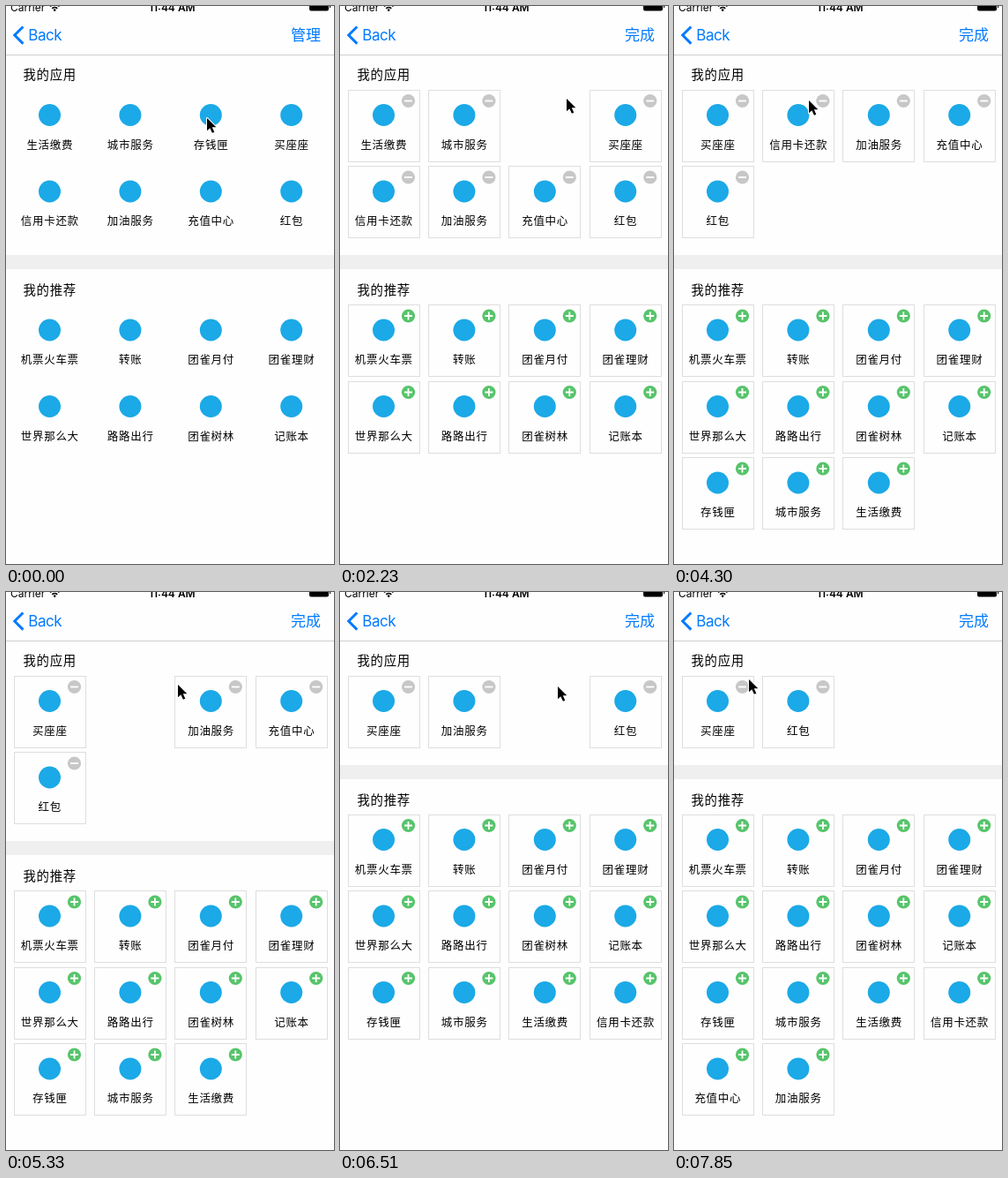
Write an HTML page that moves like this. It is 372 by 632 pixels and loops after 8 s.

```html
<!DOCTYPE html>
<html lang="zh-CN">
<head>
<meta charset="utf-8">
<style>
  html, body { margin: 0; width: 100%; height: 100%; overflow: hidden; background: #fefefe; }
  svg { display: block; width: 372px; height: 632px; }
  text { font-family: Inter, "Noto Sans CJK SC", "Noto Sans CJK", sans-serif; fill: #000; }
  .label { font-size: 12.5px; letter-spacing: .7px; text-anchor: middle; }
  .title { font-size: 14.4px; letter-spacing: .7px; }
  .link { font-size: 17px; fill: #007aff; }
  .status { font-size: 12px; }
</style>
</head>
<body>
<svg id="stage" viewBox="0 0 372 632">
  <rect width="372" height="632" fill="#fefefe"/>
  <text class="status" x="5" y="5.5">Carrier</text>
  <g fill="none" stroke="#000" stroke-width="1.7">
    <path d="M50 0.5A7.5 7.5 0 0 1 60.5 0.5M52.3 2.8A4.3 4.3 0 0 1 58.2 2.8"/>
    <circle cx="55.2" cy="4.6" r=".5"/>
  </g>
  <text class="status" x="188.3" y="5.5" text-anchor="middle" font-weight="600">11:44 AM</text>
  <path d="M344 0H366V3.5Q366 5.5 364 5.5H346Q344 5.5 344 3.5ZM367 0H368V2H367Z"/>
  <path d="M19.4 23.5L9.8 33L19.4 42.6" fill="none" stroke="#007aff" stroke-width="3"/>
  <text class="link" x="25.2" y="39" letter-spacing="-.4">Back</text>
  <text class="link" id="mode" x="323" y="39.4"></text>
  <rect y="55" width="372" height="1" fill="#cfcfcf"/>
  <text class="title" x="19.5" y="83.3">我的应用</text>
  <g id="divider">
    <rect width="372" height="16" fill="#efefef"/>
    <text class="title" x="19.5" y="45">我的推荐</text>
  </g>
  <g id="cells"></g>
  <path id="cursor" d="M0 0V14.2L3.3 11.2L5.9 16.8L8.3 15.7L5.8 10.3H10.3Z"
    stroke="#fff" stroke-width="2" paint-order="stroke" stroke-linejoin="round"/>
</svg>
<script>
const LOOP = 8000, TICK = LOOP / 54;
const EDIT_START = 5;
const ROW = 86.5, COL = 91.4;

const mine = ['生活缴费', '城市服务', '存钱匣', '买座座', '信用卡还款', '加油服务', '充值中心', '红包'];
const more = ['机票火车票', '转账', '团雀月付', '团雀理财', '世界那么大', '路路出行', '团雀树林', '记账本'];

// Tick at which each app has faded out of the first section.
const removals = [
  [15, '存钱匣'], [22, '城市服务'], [27, '生活缴费'],
  [36, '信用卡还款'], [44, '充值中心'], [50, '加油服务']
];

// Pointer path: tick, x, y.
const pointer = [
  [4, 228, 127], [9, 236, 126], [12, 257, 105], [15, 257, 105], [19, 173, 105],
  [20, 173, 105], [22, 175, 104], [25, 78, 107], [27, 78, 107], [29, 153, 107],
  [32, 165, 105], [35, 167, 105], [36, 195, 105], [38, 235, 107], [39, 235, 107],
  [42, 258, 107], [43, 258, 107], [44, 247, 107], [46, 161, 106], [47, 161, 106],
  [48, 166, 107], [49, 166, 107], [53, 85, 99]
];

const $ = id => document.getElementById(id);
const clamp = v => Math.max(0, Math.min(1, v));
const mix = (a, b, p) => a + (b - a) * p;
const ease = p => p * p * (3 - 2 * p);
const place = (el, x, y) => el.setAttribute('transform', `translate(${x} ${y})`);

function layout(count) {
  const gone = removals.slice(0, count).map(r => r[1]);
  const top = mine.filter(name => !gone.includes(name));
  const divider = 95 + ROW * Math.ceil(top.length / 4) + 14;
  const spots = {};
  const fill = (names, y, added) => names.forEach((name, i) => {
    spots[name] = { x: 9 + COL * (i % 4), y: y + ROW * Math.floor(i / 4), added };
  });
  fill(top, 95, false);
  fill(more.concat(gone), divider + 56.5, true);
  return { spots, divider };
}

const layouts = Array.from({ length: removals.length + 1 }, (_, i) => layout(i));

const cells = [...mine, ...more].map(name => {
  const el = document.createElementNS('http://www.w3.org/2000/svg', 'g');
  el.innerHTML = `
    <rect class="edit border" x=".5" y=".5" width="81" height="81" fill="#fefefe" stroke="#dedede"/>
    <circle cx="40.5" cy="28.5" r="12.5" fill="#1ba9e7"/>
    <text class="label" x="40.8" y="66.9">${name}</text>
    <g class="edit">
      <circle class="badge" cx="68.5" cy="12.5" r="7.6"/>
      <path class="sign" fill="none" stroke="#fff" stroke-width="1.8"/>
    </g>`;
  $('cells').append(el);
  return {
    name, el,
    edit: el.querySelectorAll('.edit'),
    border: el.querySelector('.border'),
    badge: el.querySelector('.badge'),
    sign: el.querySelector('.sign')
  };
});

function pointerAt(tick) {
  const next = pointer.findIndex(k => k[0] > tick);
  if (next === 0) return pointer[0].slice(1);
  if (next < 0) return pointer[pointer.length - 1].slice(1);
  const a = pointer[next - 1], b = pointer[next];
  const p = ease((tick - a[0]) / (b[0] - a[0]));
  return [mix(a[1], b[1], p), mix(a[2], b[2], p)];
}

function render(ms) {
  // The screen refreshes in even steps.
  const tick = Math.floor((ms % LOOP + 12) / TICK) % 54;
  const editing = tick >= EDIT_START;
  const count = removals.filter(r => r[0] <= tick).length;
  const before = layouts[Math.max(0, count - 1)], after = layouts[count];
  const p = count ? ease(clamp((tick - removals[count - 1][0]) / 2)) : 1;
  const moving = count ? removals[count - 1][1] : '';

  $('mode').textContent = editing ? '完成' : '管理';
  place($('divider'), 0, Math.round(mix(before.divider, after.divider, p)));

  for (const { name, el, edit, border, badge, sign } of cells) {
    const to = after.spots[name];
    const from = name === moving ? to : before.spots[name];
    const x = mix(from.x, to.x, p), y = mix(from.y, to.y, p);
    place(el, x, y);
    // Borders snap to whole pixels.
    place(border, Math.floor(x) - x, Math.floor(y) - y);
    el.setAttribute('opacity', name === moving ? p : 1);
    edit.forEach(part => part.setAttribute('visibility', editing ? 'visible' : 'hidden'));
    badge.setAttribute('fill', to.added ? '#57c46b' : '#c7c7c7');
    sign.setAttribute('d', 'M64 12.5H73' + (to.added ? 'M68.5 8V17' : ''));
  }
  place($('cursor'), ...pointerAt(tick));
}

const start = performance.now();
function frame() {
  render(performance.now() - start);
  requestAnimationFrame(frame);
}
frame();
</script>
</body>
</html>
```
